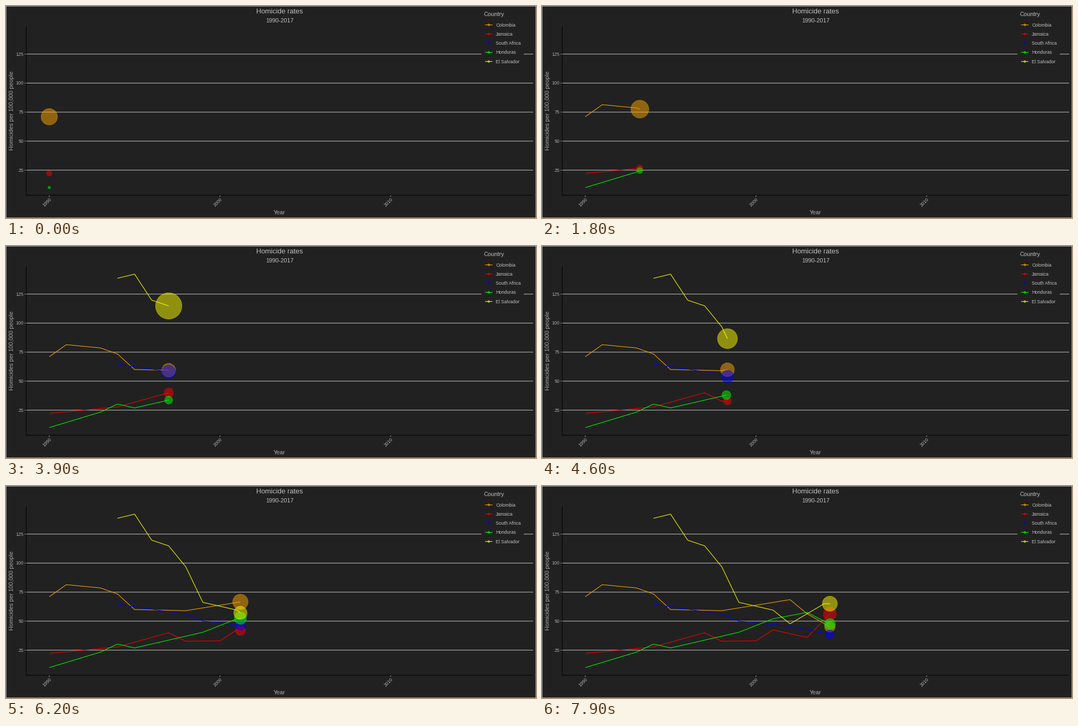
These frames come from a looping animation (1000 px wide and 400 px high, 8 s). A matplotlib script:

```python
import matplotlib.pyplot as plt
import numpy as np
from matplotlib.animation import FuncAnimation
from matplotlib.colors import to_rgba
from matplotlib.patches import Circle, Rectangle

W, H, DPI = 1000, 400, 100
PX = 72 / DPI                     # points per pixel
FRAMES, INTERVAL = 80, 100
FRAMES_PER_YEAR = 149 / 27
LAST_YEAR = 15

LEFT, RIGHT, TOP, BOTTOM = 38.2, 994.5, 38.4, 357
BACK, GREY, DIM = "#212121", "#bebebe", "#a9a9a9"
THIN = 1.07

# Turning points of each curve: years after 1990 -> rate
SERIES = {
    "Colombia": ("#ffa500", {0: 71, 1: 81.4, 3: 78.6, 4: 73.4, 5: 60,
                             8: 59, 12: 68.5, 13: 56.3, 15: 39.5}),
    "Jamaica": ("#ff0000", {0: 22.2, 4: 27.8, 7: 40, 8: 32.7, 10: 33,
                            11: 42.5, 13: 35.9, 15: 66.5}),
    "South Africa": ("#0000ff", {4: 64.5, 8: 56, 9: 50, 12: 45.5, 15: 36.5}),
    "Honduras": ("#00ff00", {0: 10, 3: 23.3, 4: 30.3, 5: 26.9, 9: 40.4,
                             11: 52, 13: 57.5, 15: 42.5}),
    "El Salvador": ("#ffff00", {4: 138.6, 5: 142.2, 6: 119.8, 7: 114.8,
                                8: 96.8, 9: 66.2, 11: 59.5, 12: 47.7,
                                14: 65}),
}
UNRECORDED = {"Honduras": range(6, 9)}

plt.rcParams["font.family"] = "Liberation Sans"
fig = plt.figure(figsize=(W / DPI, H / DPI), dpi=DPI, facecolor=BACK)
ax = fig.add_axes([0, 0, 1, 1])
ax.set_xlim(0, W)
ax.set_ylim(H, 0)
ax.axis("off")


def x_of(year):
    return 81.6 + 32.2 * year


def y_of(rate):
    return 309.7 - 2.19 * (rate - 25)


def radius(rate):
    return 0.2134 * rate + 0.354


def label(x, y, text, size, color=GREY, ha="left", **kw):
    ax.text(x, y, text, fontsize=size * PX, color=color, ha=ha,
            va="baseline", zorder=9, **kw)


def stroke(xs, ys, color, z):
    return ax.plot(xs, ys, color=color, lw=THIN * PX, zorder=z, snap=False,
                   solid_capstyle="butt")[0]


def dot(x, y, r, color, z):
    tint = to_rgba(color, 0.5)
    return ax.add_patch(Circle((x, y), r, facecolor=tint, edgecolor=tint,
                               lw=0.71 * PX, zorder=z))


def draw_axes():
    # The frame straddles the stage edge, so only its inner half shows
    ax.add_patch(Rectangle((0, 0), W, H, fill=False, edgecolor="white",
                           lw=THIN * PX, snap=False, zorder=10))
    for rate in range(25, 126, 25):
        y = y_of(rate)
        stroke([LEFT - 2.75, RIGHT], [y, y], GREY, 1)
        label(33, y + 3, str(rate), 8.8, DIM, "right")
    for year in (0, 10, 20):
        x = x_of(year)
        stroke([x, x], [BOTTOM, BOTTOM + 2.75], GREY, 1)
        label(x - 2.2, 372.5, str(1990 + year), 8.8, DIM, "center",
              rotation=45, rotation_mode="anchor")
    stroke([LEFT, LEFT], [TOP, BOTTOM], "black", 5)
    stroke([LEFT, RIGHT], [BOTTOM, BOTTOM], "black", 5)

    mid = (LEFT + RIGHT) / 2
    label(mid, 14, "Homicide rates", 13.2, ha="center")
    label(mid, 31, "1990-2017", 11, ha="center")
    label(mid, 393, "Year", 11, DIM, "center")
    label(13.6, 197.6, "Homicides per 100,000 people", 11, DIM, "center",
          rotation=90, rotation_mode="anchor")


def draw_legend():
    ax.add_patch(Rectangle((897, 5), 80, 113, color=BACK, lw=0, zorder=6))
    label(902, 19.3, "Country", 11)
    for i, (name, (color, _)) in enumerate(SERIES.items()):
        y = 35.6 + 17.28 * i
        stroke([903.9, 917.7], [y, y], color, 7)
        dot(910.8, y, 1.95, color, 8)
        label(924.3, y + 3, name, 8.8)


class Track:
    """One country's growing line and its leading bubble."""

    def __init__(self, name, order):
        color, turns = SERIES[name]
        skipped = UNRECORDED.get(name, ())
        self.years = np.array([y for y in range(min(turns), LAST_YEAR + 1)
                               if y not in skipped])
        self.rates = np.interp(self.years, list(turns), list(turns.values()))
        # Each year is reached on a whole frame
        self.keys = np.round(self.years * FRAMES_PER_YEAR)
        self.line = stroke([], [], color, 2 + order / 10)
        self.bubble = dot(0, 0, 1, color, 3 + order / 10)
        for art in (self.line, self.bubble):
            art.set_clip_path(panel)

    def show(self, frame):
        begun = frame >= self.keys[0]
        self.line.set_visible(begun)
        self.bubble.set_visible(begun)
        if not begun:
            return
        year = np.interp(frame, self.keys, self.years)
        rate = np.interp(frame, self.keys, self.rates)
        past = self.keys < frame
        self.line.set_data(x_of(np.append(self.years[past], year)),
                           y_of(np.append(self.rates[past], rate)))
        self.bubble.center = x_of(year), y_of(rate)
        self.bubble.set_radius(radius(rate))


panel = Rectangle((LEFT, TOP), RIGHT - LEFT, BOTTOM - TOP,
                  transform=ax.transData)
draw_axes()
draw_legend()
tracks = [Track(name, i) for i, name in enumerate(SERIES)]


def update(frame):
    for track in tracks:
        track.show(frame)
    return []


anim = FuncAnimation(fig, update, frames=FRAMES, interval=INTERVAL,
                     init_func=lambda: update(0), repeat=True,
                     repeat_delay=0, blit=False)
plt.show()
```
